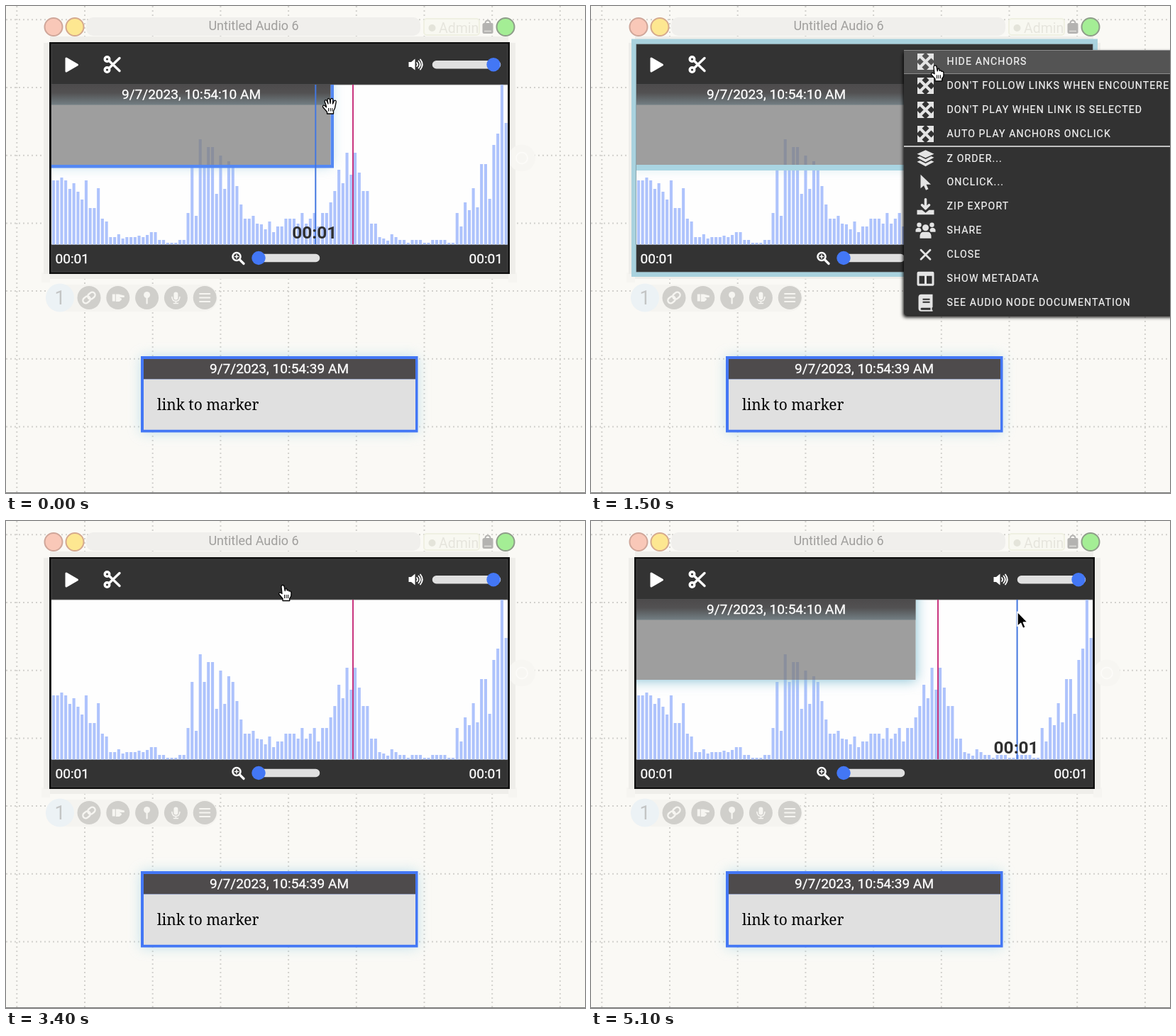
Animation, 816 px wide and 687 px high, one loop 6400 ms. Source, as an HTML page:

```html
<!DOCTYPE html>
<html lang="en">
<head>
<meta charset="utf-8">
<title>Audio markers</title>
<style>
html, body { margin: 0; width: 100%; height: 100%; overflow: hidden; background: #faf9f5; }
svg { display: block; width: 816px; height: 687px; font-family: Roboto, sans-serif; }
.line { fill: none; stroke: currentColor; stroke-linecap: round; stroke-linejoin: round; }
.menu text { font-size: 14.1px; letter-spacing: 1.1px; fill: #f4f4f4; stroke: #f4f4f4; stroke-width: .2px; }
.ui { font-size: 19.1px; fill: #fff; stroke: #fff; stroke-width: .3px; }
</style>
</head>
<body>
<svg id="stage" viewBox="0 0 816 687">
  <defs>
    <filter id="blur" x="-20%" y="-40%" width="140%" height="180%"><feGaussianBlur stdDeviation="9"/></filter>
    <filter id="tight"><feGaussianBlur stdDeviation="2.5"/></filter>
    <filter id="soft"><feGaussianBlur stdDeviation=".7"/></filter>
    <linearGradient id="head" x2="0" y2="1">
      <stop offset="0" stop-color="#4d4b4c"/><stop offset=".4" stop-color="#525152"/><stop offset="1" stop-color="#737f84"/>
    </linearGradient>
    <clipPath id="wave"><rect x="64" y="111" width="643" height="225.5"/></clipPath>
    <clipPath id="around"><path clip-rule="evenodd" d="M64 111H707V336H64ZM64 111V224H457.5V111Z"/></clipPath>
  </defs>

  <rect width="816" height="687" fill="#faf9f5"/>
  <g id="grid" stroke="#d2d1cd" stroke-width="2" stroke-dasharray="2 4"></g>
  <path d="M0 686.5H816" stroke="#777"/>

  <!-- title bar -->
  <rect x="113" y="16" width="471" height="26" rx="10" fill="#f0efec"/>
  <text x="349" y="34" font-size="18" text-anchor="middle" fill="#a09f9d">Untitled Audio 6</text>
  <rect x="589" y="18" width="78" height="23" rx="4" fill="#f8f8f1" stroke="#eff0e2" stroke-width="2"/>
  <circle cx="600.5" cy="31" r="5" fill="#e4e4da"/>
  <text x="610" y="38" font-size="19.5" fill="#e6e5dd">Admin</text>
  <rect x="671.5" y="24" width="15" height="15" rx="2.5" fill="#b4b3b1"/>
  <path d="M675.5 27v-3a3.5 3.5 0 0 1 7 0v3" fill="none" stroke="#b4b3b1" stroke-width="2"/>
  <path d="M674 35.5h10" stroke="#dddcd9" stroke-width="1.5"/>
  <g stroke-width="2">
    <circle cx="67" cy="29.5" r="12.5" fill="#f9c8b8" stroke="#cfa699"/>
    <circle cx="97" cy="29.5" r="12.5" fill="#fde791" stroke="#d5a98d"/>
    <circle cx="704" cy="29.5" r="12.5" fill="#a4ee95" stroke="#8e9d89"/>
  </g>

  <!-- resize handles -->
  <path d="M50 376h12v14h-12zM708 376h12v14h-12z" fill="#f6f5f1"/>
  <path d="M53 52h8v326h-8zM710 52h8v326h-8zM62 43h646v8H62zM62 378h646v7H62z" fill="#efeeea"/>
  <circle cx="727" cy="214.5" r="19" fill="#f7f6f2"/>
  <circle cx="727" cy="214.5" r="8" fill="none" stroke="#fcfbf8" stroke-width="2"/>

  <!-- player -->
  <rect x="61" y="51" width="649" height="327" fill="#111"/>
  <rect id="outline" x="57" y="46.5" width="657" height="335.5" fill="#a9d2de"/>
  <rect x="64" y="54" width="643" height="321" fill="#333" stroke="#505050" stroke-width=".7"/>
  <rect x="64" y="111" width="643" height="225.5" fill="#fefefe"/>
  <path d="M64 111H707" stroke="#777" stroke-width=".8"/>
  <g clip-path="url(#wave)"><g id="bars" fill="#aec3fc" filter="url(#soft)"></g></g>

  <g id="anchor" clip-path="url(#wave)">
    <g clip-path="url(#around)"><rect id="glow" x="50" y="90" width="408" height="135" fill="#84bfd3" filter="url(#blur)"/></g>
    <rect x="64" y="111" width="393.5" height="113" fill="#808080" fill-opacity=".76"/>
    <rect x="64" y="111" width="393.5" height="28.5" fill="url(#head)"/>
    <text class="ui" x="261" y="131" text-anchor="middle">9/7/2023, 10:54:10 AM</text>
    <path id="edge" fill="none"/>
  </g>

  <path d="M489 111V336" stroke="#c9357f" stroke-width="2"/>
  <g id="hover">
    <path d="M0 111V336" stroke="#4377e0" stroke-width="2"/>
    <text x="-1.5" y="327.5" font-size="24.5" font-weight="700" text-anchor="middle" fill="#303030">00:01</text>
  </g>

  <g fill="#fff" color="#fff">
    <path class="line" style="fill:#fff" stroke-width="3" d="M85 74V92L100.5 83Z"/>
    <g class="line" stroke-width="3.4">
      <circle cx="142.5" cy="75" r="3.3"/><circle cx="142.5" cy="90" r="3.3"/>
      <path d="M145.5 77.5L160 91.5M145.5 87.5L160 73.5"/>
    </g>
    <path d="M567.5 79H571L576.5 74.5V90.5L571 86H567.5Z"/>
    <path class="line" stroke-width="1.8" d="M579 80q2.2 2.5 0 5M581.5 77.5q4.5 5 0 10M584 75.5q5.5 7 0 14"/>
    <circle class="line" cx="325" cy="353.5" r="5.5" stroke-width="2.6"/>
    <path class="line" stroke-width="3.2" d="M330 358.5L335 363.5"/>
    <path class="line" stroke-width="1.5" d="M322.5 353.5h5M325 351v5"/>
  </g>
  <path d="M606.5 82.7H691.5M353 355.5H436.5" stroke="#e0e0e0" stroke-width="11.5" stroke-linecap="round"/>
  <g fill="#4377f5"><circle cx="687" cy="82.7" r="9.7"/><circle cx="356" cy="355.5" r="9.7"/></g>
  <text class="ui" x="69.5" y="362.5">00:01</text>
  <text class="ui" x="700" y="362.5" text-anchor="end">00:01</text>

  <!-- tool strip -->
  <rect x="56" y="393" width="242" height="38" rx="19" fill="#f5f4f0"/>
  <circle cx="76" cy="411.5" r="20" fill="#ecf2f5"/>
  <text x="76" y="420.5" font-size="27" text-anchor="middle" fill="#c3c5c5">1</text>
  <g id="tools" color="#f6f5f1"></g>

  <!-- note -->
  <rect x="190" y="494" width="390" height="108" fill="#a5d5e6" opacity=".65" filter="url(#blur)"/>
  <rect x="190" y="494" width="390.5" height="107.5" fill="#4377f5"/>
  <rect x="194" y="498" width="383" height="28.5" fill="#4e4b4c"/>
  <rect x="194" y="526.5" width="383" height="71.3" fill="#e0e0e0"/>
  <text class="ui" x="385" y="518" text-anchor="middle">9/7/2023, 10:54:39 AM</text>
  <text x="213" y="570" font-size="20.9" style="font-family:'Noto Serif',serif" fill="#000">link to marker</text>

  <g id="menu" class="menu"></g>
  <g id="ring" fill="none">
    <circle r="42" stroke="#fff" stroke-width="4.4"/><circle r="42" stroke="#111" stroke-width="2"/>
  </g>
  <g id="arrow"><path d="M0 0V20.5L4.7 16.2L7.7 23.5L11.3 22L8.3 14.9H14.5Z" fill="#000" stroke="#fff" stroke-width="1.5" stroke-linejoin="round"/></g>
  <g id="point" fill="#fff" stroke="#000" stroke-width="1.3" stroke-linejoin="round">
    <path d="M-2 2Q-2-.5 0-.5T2.2 2L3.2 7.5Q5 0 6.2 7Q8.5 5.8 9 8Q11.8 7.2 12 10.5L11.8 15L9.7 18V21.5H0V18.5L-5.5 12Q-5 8.5-1 11.5Z"/>
    <path d="M2.5 13v5M5 13v5M7.5 13v5" stroke-width="1"/>
  </g>
  <g id="grab" fill="#fff" stroke="#000" stroke-width="1.3" stroke-linejoin="round">
    <path d="M-5-1L-7-6.500Q-6.500-9.500-4-7.500L-2-3L-3-9Q-1.500-12 .3-9L1-3.500L1.500-9.500Q3.800-12 4.800-9L4.500-3L6.500-7.500Q9.500-8.500 9.200-5.500L7.500 3L5.500 7V11H-3.500V8.500L-9.500 1.500Q-10-2-6.500-.3L-4.500 1.800Z"/>
    <path d="M-1.5 3v4.5M1.2 3v4.5M3.8 3v4.5" stroke-width="1"/>
  </g>
</svg>
<script>
const el = id => document.getElementById(id);
const LOOP = 6400, STEP = 100;

const grid = [];
for (let i = 0; i < 9; i++) {
  const x = 15.3 + i * 95.7, y = 19.3 + i * 95.7;
  grid.push(`<path d="M${x} 0V686"/>`);
  if (y < 687) grid.push(`<path d="M0 ${y}H816"/>`);
}
el('grid').innerHTML = grid.join('');

const heights = [
  90, 90, 94, 90, 78, 86, 74, 63, 90, 51, 51, 79, 36, 32, 10, 10, 14, 8, 10, 10, 10, 12, 10, 13, 17, 17, 6, 6,
  2, 2, 2, 6, 6, 44, 109, 40, 148, 109, 137, 137, 71, 125, 78, 117, 109, 82, 56, 36, 36, 40, 29, 28, 21, 32, 17, 25,
  25, 36, 36, 36, 29, 44, 29, 36, 44, 25, 44, 44, 59, 75, 105, 86, 129, 98, 129, 101, 75, 75, 29, 29, 10, 8, 5, 14,
  10, 6, 6, 2, 6, 6, 6, 2, 2, 6, 6, 6, 6, 2, 2, 44, 25, 59, 48, 79, 52, 113, 113, 64, 140, 156, 225, 171];
el('bars').innerHTML = heights.map((h, i) =>
  `<rect x="${(64.9 + i * 5.745).toFixed(1)}" y="${336 - h}" width="4.1" height="${h + 4}"/>`).join('');

const tools = [
  '<g transform="rotate(-40)" stroke-width="2.4"><rect class="line" x="-10" y="-4" width="11" height="8" rx="4"/><rect class="line" x="-1" y="-4" width="11" height="8" rx="4"/></g>',
  '<path fill="currentColor" d="M-8-5H-4V5H-8ZM-3-5H1L9-3V-.5H2L5 1V3L2 5.5H-3Z"/>',
  '<circle cy="-4" r="4.5" fill="currentColor"/><path class="line" stroke-width="2.2" d="M0 0V8"/>',
  '<rect x="-3" y="-8" width="6" height="11" rx="3" fill="currentColor"/><path class="line" stroke-width="1.6" d="M-5.5-1Q-5 5 0 5T5.5-1M0 5V8M-3 8H3"/>',
  '<path class="line" stroke-width="2.2" d="M-7-5.5H7M-7 0H7M-7 5.5H7"/>'];
el('tools').innerHTML = tools.map((d, i) =>
  `<g transform="translate(${117 + i * 40.8} 411.5)"><circle r="16.5" fill="#d0cfcb"/>${d}</g>`).join('');

// menu icons, centred on 0,0
const fill = d => `<path fill="currentColor" d="${d}"/>`;
const line = (d, w) => `<path class="line" stroke-width="${w}" d="${d}"/>`;
const expand = line('M-7-7L7 7M7-7L-7 7', 4) +
  fill('M-11.5-11.5H-1.5L-11.5-1.5ZM11.5-11.5V-1.5L1.5-11.5ZM-11.5 11.5V1.5L-1.5 11.5ZM11.5 11.5H1.5L11.5 1.5Z');
const person = (x, y, r) => `<circle cx="${x}" cy="${y}" r="${r}" fill="currentColor"/>`;
const icons = {
  layers: fill('M0-12L12-6.5L0-1L-12-6.5ZM-12-1.5L-8-3.2L0 .8L8-3.2L12-1.5L0 5ZM-12 4.5L-8 2.8L0 6.8L8 2.8L12 4.5L0 11Z'),
  arrow: fill('M-7-11V8.5L-2.5 4.5L.5 11L4 9.5L1 3H7.5Z'),
  download: line('M0-10V2M-5-2L0 3L5-2', 3.6) + fill('M-12 5H-5L0 9L5 5H12V11.5H-12Z'),
  users: person(0, -4, 4.5) + person(-9, -8, 3.2) + person(9, -8, 3.2) +
    fill('M-8 11V7Q-7 2-3 2H3Q7 2 8 7V11ZM-14 2V-1Q-13-4-9-4Q-6-3-6 0L-7 2ZM14 2V-1Q13-4 9-4Q6-3 6 0L7 2Z'),
  close: line('M-6.5-6.5L6.5 6.5M6.5-6.5L-6.5 6.5', 2.8),
  columns: '<path fill="currentColor" fill-rule="evenodd" d="M-12-8Q-12-10-10-10H10Q12-10 12-8V8Q12 10 10 10H-10Q-12 10-12 8ZM-9-4V7H-1.5V-4ZM1.5-4V7H9V-4Z"/>',
  book: '<path fill="currentColor" fill-rule="evenodd" d="M-10-8Q-10-12-6-12H10V6L9 7V10H10V12H-6Q-10 12-10 8ZM-4-6V-4H6V-6ZM-4-2V0H6V-2ZM-6 7Q-8 8.5-6 10H7V7Z"/>'
};
const rows = [
  ['', expand, 16], ["DON'T FOLLOW LINKS WHEN ENCOUNTERED", expand, 50],
  ["DON'T PLAY WHEN LINK IS SELECTED", expand, 84], ['AUTO PLAY ANCHORS ONCLICK', expand, 118],
  ['Z ORDER...', icons.layers, 152.7], ['ONCLICK...', icons.arrow, 186.3], ['ZIP EXPORT', icons.download, 220.3],
  ['SHARE', icons.users, 254.3], ['CLOSE', icons.close, 288.3],
  ['SHOW METADATA', icons.columns, 322.3], ['SEE AUDIO NODE DOCUMENTATION', icons.book, 356.3]];
el('menu').innerHTML =
  `<rect x="-1" y="3" width="482" height="374" rx="4" filter="url(#tight)"/>
   <rect width="480" height="374" rx="4" fill="#323232"/>
   <g id="active"><rect width="480" height="33.5" fill="#545454"/><path d="M0 .5H480M0 33.5H480" stroke="#8d8d8d"/></g>
   <path d="M0 136H480" stroke="#f0f0f0" stroke-width="1.5"/>` +
  rows.map(([label, icon, y], i) => `<g transform="translate(0 ${y})" color="#e4e4e4">
    <g transform="translate(30.5 .5)">${icon}</g><text x="60.5" y="5"${i ? '' : ' id="toggle"'}>${label}</text>
    ${i === 4 || i === 5 ? line('M445-5.5l5.5 5.5l-5.5 5.5', 1.5) : ''}</g>`).join('');

// time, x, y
const path = [
  [0, 456, 141], [400, 458, 108], [700, 460, 92], [900, 460, 92], [1200, 461, 80], [1300, 461, 83],
  [1600, 497, 85], [1900, 518, 85], [2300, 518, 85], [2700, 442, 85], [3000, 390, 91], [3400, 390, 91],
  [3600, 402, 89], [3900, 434, 86], [4600, 434, 86], [4700, 446, 86], [4900, 542, 104], [5000, 585, 120],
  [5100, 601, 128], [LOOP, 601, 128]];
// start, end, menu x, menu y, label
const menus = [
  [1300, 2300, 441, 62, 'HIDE ANCHORS'],
  [3500, 4400, 368, 69, "DON'T HIDE ANCHORS"]];
// start, x, y, scale
const clicks = [[2100, 518, 85, .9], [4100, 432, 86, 1]];

const show = (id, on) => el(id).style.display = on ? '' : 'none';
const move = (id, x, y, s = 1) => el(id).setAttribute('transform', `translate(${x} ${y}) scale(${s})`);

function cursorAt(t) {
  const i = Math.max(1, path.findIndex(p => p[0] >= t));
  const [t0, x0, y0] = path[i - 1], [t1, x1, y1] = path[i];
  const k = (t - t0) / (t1 - t0);
  return [x0 + (x1 - x0) * k, y0 + (y1 - y0) * k];
}

function draw(now) {
  const t = Math.floor((now % LOOP) / STEP) * STEP;
  const [x, y] = cursorAt(t);
  const menu = menus.find(m => t >= m[0] && t < m[1]);
  const inWave = y > 111 && !menu;
  const onAnchor = inWave && x < 462;

  show('menu', menu);
  show('outline', menu);
  if (menu) {
    move('menu', menu[2], menu[3]);
    el('menu').style.opacity = t === menu[0] || t === menu[1] - STEP ? .5 : 1;
    el('toggle').textContent = menu[4];
    show('active', x > menu[2] + 20);
  }

  show('anchor', t < 2200 || t >= 4300);
  el('glow').style.opacity = menu || onAnchor ? .65 : 1;
  const edge = el('edge');
  show('edge', menu || onAnchor);
  edge.setAttribute('d', menu ? 'M64 228H461V111' : 'M64 226.2H459.8V111');
  edge.setAttribute('stroke', menu ? '#a9d5e2' : '#5488f3');
  edge.setAttribute('stroke-width', menu ? 8 : 4.4);

  show('hover', inWave);
  move('hover', onAnchor ? 436.3 : x - .4, 0);

  const click = clicks.find(c => t >= c[0] && t < c[0] + STEP);
  show('ring', click);
  if (click) move('ring', click[1], click[2], click[3]);

  const kind = onAnchor ? 'grab' : menu || t === 3400 ? 'point' : 'arrow';
  for (const id of ['arrow', 'point', 'grab']) show(id, id === kind);
  move(kind, x, y);
}

const start = performance.now();
function tick(now) {
  draw(Math.max(0, now - start));
  requestAnimationFrame(tick);
}
draw(0);
requestAnimationFrame(tick);
</script>
</body>
</html>
```
